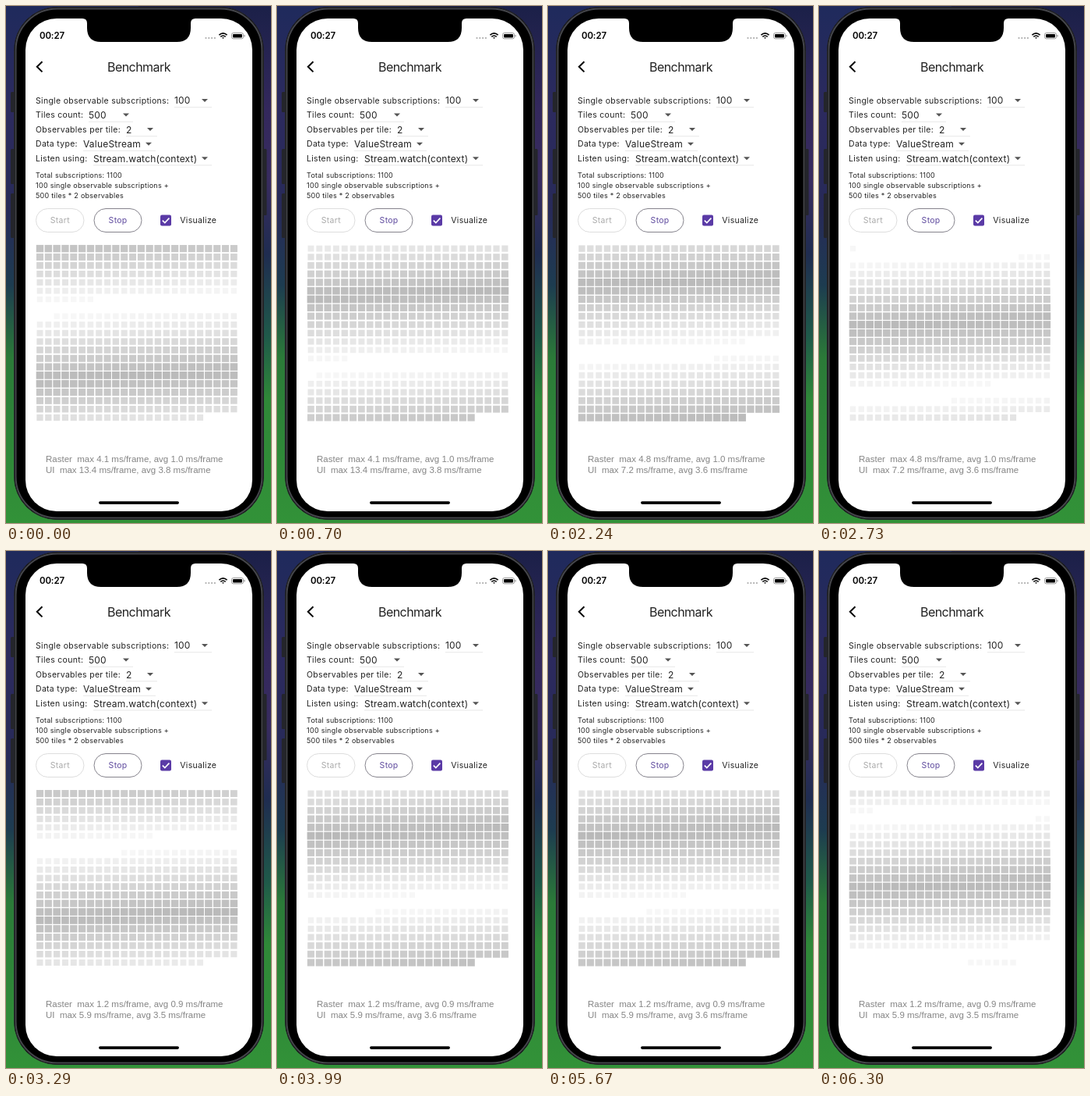
Recreate the animation shown at these times as an HTML page. Size 340 px wide and 662 px high, loop 6.37 s.

```html
<!DOCTYPE html>
<html lang="en">
<head>
<meta charset="utf-8">
<title>Benchmark</title>
<style>
  html, body { margin: 0; width: 100%; height: 100%; overflow: hidden; }
  svg { display: block; }
  text { font: 10.5px Inter, "Noto Sans", sans-serif; letter-spacing: .3px; fill: #222; white-space: pre; }
  .value { font-size: 12px; letter-spacing: .2px; }
  .small { font-size: 9px; letter-spacing: .27px; }
  .title { font-size: 16px; letter-spacing: -.55px; }
  .clock { font-size: 11.5px; letter-spacing: -.15px; font-weight: 600; fill: #000; }
  .button { text-anchor: middle; }
  .stats { font: 11.5px "Liberation Sans", Arial, sans-serif; letter-spacing: 0; fill: #858585; }
</style>
</head>
<body>
<svg width="340" height="662" viewBox="0 0 340 662">
  <defs>
    <linearGradient id="left" x2="0" y2="1">
      <stop offset="0" stop-color="#1f2a5c"/>
      <stop offset=".2" stop-color="#2c2a5e"/>
      <stop offset=".4" stop-color="#272a58"/>
      <stop offset=".54" stop-color="#1d3c50"/>
      <stop offset=".68" stop-color="#2b7a38"/>
      <stop offset="1" stop-color="#329238"/>
    </linearGradient>
    <linearGradient id="right" x2="0" y2="1">
      <stop offset="0" stop-color="#1b2048"/>
      <stop offset=".2" stop-color="#33285c"/>
      <stop offset=".34" stop-color="#382c60"/>
      <stop offset=".48" stop-color="#1f2c50"/>
      <stop offset=".64" stop-color="#1f5a4a"/>
      <stop offset=".76" stop-color="#2f8838"/>
      <stop offset="1" stop-color="#329238"/>
    </linearGradient>
  </defs>
  <rect width="170" height="662" fill="url(#left)"/>
  <rect x="170" width="170" height="662" fill="url(#right)"/>

  <g fill="#24252b">
    <rect x="6" y="110" width="6" height="26" rx="1.5"/>
    <rect x="6" y="183" width="6" height="45" rx="1.5"/>
    <rect x="6" y="240" width="6" height="57" rx="1.5"/>
    <rect x="329" y="183" width="5.5" height="85" rx="1.5"/>
  </g>
  <rect x="10.5" y="1.5" width="320" height="656" rx="55" fill="#000" stroke="#25262b"/>
  <rect x="12.5" y="3.5" width="316" height="652" rx="53" fill="#000" stroke="#45464b" stroke-width="2"/>
  <rect x="25" y="16" width="291" height="631" rx="40" fill="#fff"/>
  <path d="M98 15V16Q104 16 104 22V28Q104 46 122 46H219Q237 46 237 28V22Q237 16 243 16V15Z"/>

  <text class="clock" x="43" y="42">00:27</text>
  <g fill="#aaa">
    <circle cx="256.5" cy="41" r="1.1"/><circle cx="260.3" cy="41" r="1.1"/>
    <circle cx="264.1" cy="41" r="1.1"/><circle cx="267.9" cy="41" r="1.1"/>
  </g>
  <g fill="none" stroke="#000" stroke-width="1.6">
    <path d="M273.4 37.2Q278.5 32.6 283.6 37.2M275.3 39.4Q278.5 36.6 281.7 39.4"/>
    <path d="M277 40.3H280L278.5 42Z" fill="#000" stroke="none"/>
    <rect x="289.5" y="34.5" width="15" height="7.4" rx="2.2" stroke="#999" stroke-width="1"/>
    <rect x="291" y="36" width="12" height="4.4" rx="1" fill="#000" stroke="none"/>
    <path d="M306 37V39.6" stroke="#999" stroke-width="1.2"/>
    <path d="M46.5 71.2L39.8 77.8L46.5 84.4" stroke-width="2"/>
  </g>
  <text class="title" x="130" y="84">Benchmark</text>

  <g id="options"></g>

  <text class="small" x="38" y="220">Total subscriptions: 1100</text>
  <text class="small" x="38" y="233">100 single observable subscriptions +</text>
  <text class="small" x="38" y="246">500 tiles * 2 observables</text>

  <rect x="38.5" y="259.5" width="61.5" height="30" rx="15" fill="none" stroke="#ddd"/>
  <text class="button" x="69.3" y="278" style="fill:#aaa">Start</text>
  <rect x="113" y="259.5" width="61" height="30" rx="15" fill="none" stroke="#85838c"/>
  <text class="button" x="143.6" y="278" style="fill:#5f4b9e">Stop</text>
  <rect x="198" y="267.5" width="14" height="14" rx="2" fill="#5a3aa6"/>
  <path d="M200.8 274.6L203.8 277.6L209.4 271.6" fill="none" stroke="#fff" stroke-width="1.6"/>
  <text x="223.3" y="278">Visualize</text>

  <g id="tiles"></g>

  <text class="stats" id="raster" x="51" y="584"></text>
  <text class="stats" id="ui" x="51" y="598"></text>
  <rect x="119" y="634.3" width="103" height="3.6" rx="1.8"/>
</svg>
<script>
const LOOP = 6370, STEP = 70;
const TILES = 500, COLUMNS = 24, PITCH = 10.82, LEFT = 43.5, TOP = 310.6;
const WAVE = 400, WAVE_START = 172, TILES_PER_STEP = 50 / 3;
const FAINTEST = .11;

const byId = id => document.getElementById(id);

function set(node, attributes) {
  for (const name in attributes) node.setAttribute(name, attributes[name]);
}

function add(parent, tag, attributes, text = "") {
  const node = document.createElementNS("http://www.w3.org/2000/svg", tag);
  set(node, attributes);
  node.textContent = text;
  return parent.appendChild(node);
}

// label, value, value x, arrow centre, underline end
[
  ["Single observable subscriptions:", "100", 216, 255, 264],
  ["Tiles count:", "500", 106, 154, 163],
  ["Observables per tile:", "2", 154, 185, 194],
  ["Data type:", "ValueStream", 99, 183, 192],
  ["Listen using:", "Stream.watch(context)", 112, 255, 264],
].forEach(([label, value, x, arrow, end], row) => {
  const y = 121 + row * 18.55, group = byId("options");
  add(group, "text", { x: 38, y: y + 3.7 }, label);
  add(group, "text", { x, y: y + 4.4, class: "value" }, value);
  add(group, "path", { d: `M${arrow - 4} ${y - 2}h8l-4 4z`, fill: "#555" });
  add(group, "path", { d: `M${x} ${y + 8.7}H${end}`, stroke: "#ddd", "stroke-width": .7 });
});

const tiles = Array.from({ length: TILES }, () => add(byId("tiles"), "rect", {}));

// start time, raster max, raster average, UI max, UI average
const readings = [
  [0, "4.1", "1.0", "13.4", "3.8"],
  [840, "4.8", "1.0", "7.7", "3.6"],
  [1820, "4.8", "1.0", "7.2", "3.6"],
  [2870, "1.2", "0.9", "5.9", "3.5"],
  [3920, "1.2", "0.9", "5.9", "3.6"],
  [5950, "1.2", "0.9", "5.9", "3.5"],
];
const report = (name, max, avg) => `${name}  max ${max} ms/frame, avg ${avg} ms/frame`;

// Darker tiles are also larger; the faintest vanish.
function drawTile(tile, i, trough) {
  const phase = ((i - trough) % WAVE + WAVE) % WAVE;
  const strength = Math.min(phase, WAVE - phase) / (WAVE / 2);
  const size = 7 + 2.8 * strength;
  const shade = strength < FAINTEST ? 255 : Math.round(255 - 70 * strength);
  set(tile, {
    x: LEFT + i % COLUMNS * PITCH - size / 2,
    y: TOP + Math.floor(i / COLUMNS) * PITCH - size / 2,
    width: size, height: size,
    fill: `rgb(${shade},${shade},${shade})`,
  });
}

function draw(now) {
  const step = Math.floor(now % LOOP / STEP);
  const trough = WAVE_START + step * TILES_PER_STEP;
  tiles.forEach((tile, i) => drawTile(tile, i, trough));
  const [, rasterMax, rasterAvg, uiMax, uiAvg] = readings.findLast(r => r[0] <= step * STEP);
  byId("raster").textContent = report("Raster", rasterMax, rasterAvg);
  byId("ui").textContent = report("UI", uiMax, uiAvg);
}

const start = performance.now();
function tick() {
  draw(performance.now() - start);
  requestAnimationFrame(tick);
}
tick();
</script>
</body>
</html>
```
